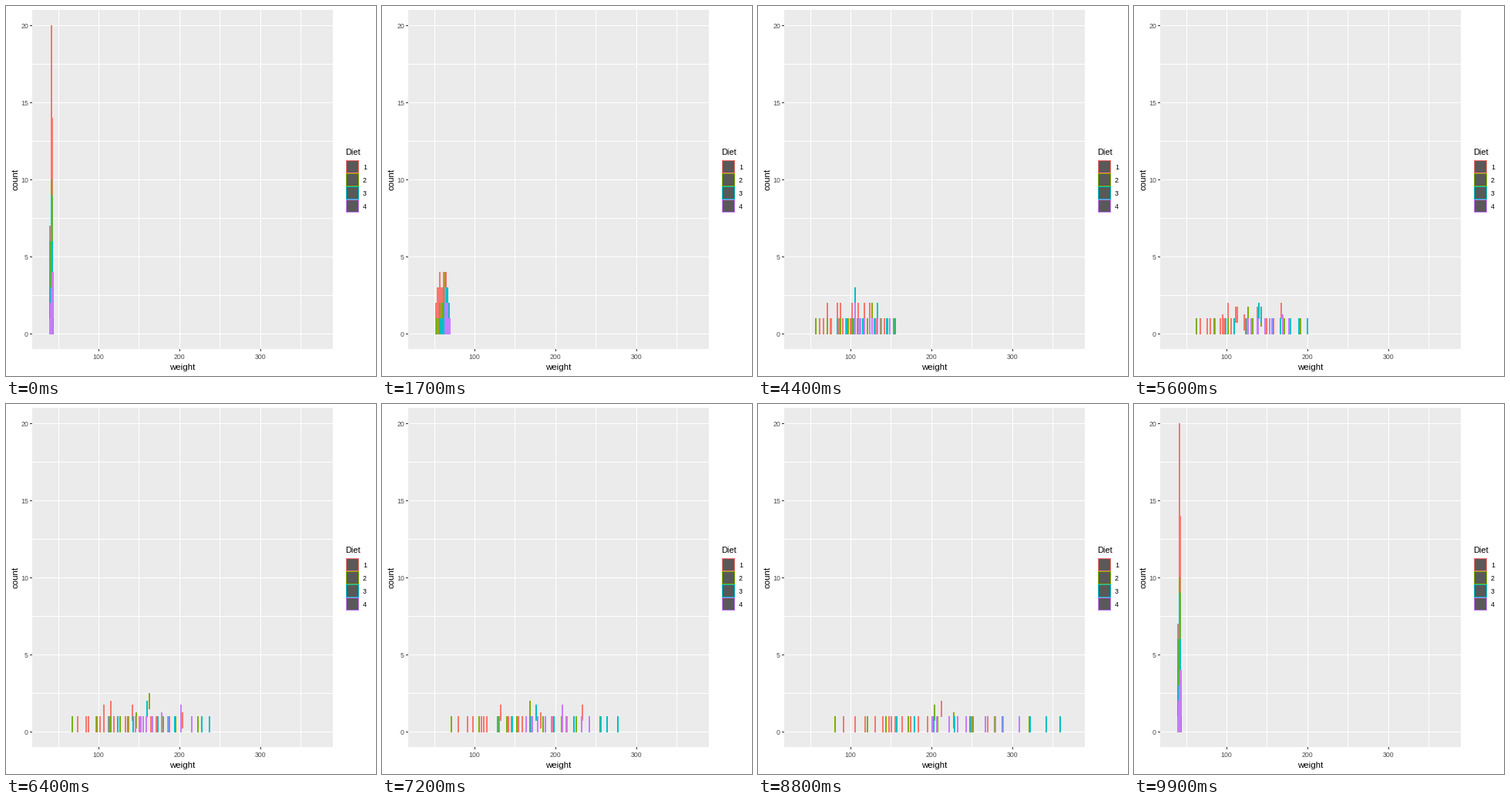
Recreate the animation shown at these times as a matplotlib script. Size 480 by 480 pixels, loop 10 s.

```python
import math

import matplotlib.pyplot as plt
import numpy as np
from matplotlib.animation import FuncAnimation
from matplotlib.collections import PolyCollection
from matplotlib.patches import Rectangle

SIZE = 480
FRAMES, INTERVAL = 100, 100
COLORS = ["#F8766D", "#7CAE00", "#00BFC4", "#C77CFF"]
DAYS = [*range(0, 21, 2), 21]
STARTS = [5, 14, 23, 32, 41, 49, 56, 64, 72, 80, 88, 96]

# Birds per diet weighing 39..43 at hatching
HATCH = [(1, 1, 10, 5, 3), (3, 2, 1, 3, 1), (2, 0, 6, 2, 0), (1, 2, 3, 4, 0)]

# Per diet: gain, power of time, then spread over rank (linear, square, cubic)
GROWTH = [(2.5, 1.3, 0.5, 0.2, 0.3), (3.2, 1.3, 0.45, 0, 0.3),
          (2.85, 1.45, 0.45, -0.03, 0), (4, 1.3, 0.27, 0.07, 0)]


def alive(diet, day):
    if diet == 0:
        return 20 - (day >= 4) - (day >= 14) - (day >= 16) - (day > 20)
    return 10 - (diet == 3 and day >= 20)


def flock(diet, day):
    """Whole weights of one diet on one day."""
    if day == 0:
        return np.repeat(np.arange(39, 44), HATCH[diet])
    gain, power, a, b, c = GROWTH[diet]
    u = np.linspace(-1, 1, alive(diet, day))
    noise = np.random.default_rng(10 * day + diet).normal(0, 0.05, len(u))
    spread = a * u + b * u**2 + c * u**3 + noise * (1 - u**2)
    vigor = 1 + spread * min(1, day / 8)
    return np.rint(41 + gain * day**power * vigor)


def stack(day):
    """Rows of (weight, bottom, top) per diet, last diet lowest."""
    base, rows = {}, {}
    for diet in (3, 2, 1, 0):
        rows[diet] = []
        for x, n in zip(*np.unique(flock(diet, day), return_counts=True)):
            y = base.get(x, 0)
            base[x] = y + n
            rows[diet].append((x, y, y + n))
        rows[diet] = np.array(rows[diet], float)
    return rows


STATES = [stack(day) for day in DAYS]


def tween(a, b, p):
    """Match bars by rank; surplus old bars wait, new ones come at the end."""
    n = min(len(a), len(b))
    return np.vstack([a[:n] + (b[:n] - a[:n]) * p, a[n:]])


def pose(frame):
    state = 0
    for k, start in enumerate(STARTS):
        steps = 3 if k == 5 else 4
        after = (k + 1) % len(STATES)
        if frame >= start + steps - 1:
            state = after
        elif frame >= start:
            p = (frame - start + 1) / steps
            return {d: tween(STATES[k][d], STATES[after][d], p)
                    for d in range(4)}
    return STATES[state]


def snap(v):
    return math.floor(v + 0.5)


def to_x(w):
    return 15.14 + 1.049 * w


def to_y(count):
    return 425 - 20 * count


def bar(x, bottom, top):
    x0 = snap(to_x(x - 0.45))
    y0, y1 = snap(to_y(top)), snap(to_y(bottom)) + 1
    return [(x0, y0), (x0 + 2, y0), (x0 + 2, y1), (x0, y1)]


fig = plt.figure(figsize=(4.8, 4.8), dpi=100, facecolor="white")
ax = fig.add_axes([0, 0, 1, 1])
ax.set_xlim(0, SIZE)
ax.set_ylim(SIZE, 0)
ax.axis("off")


def box(x, y, w, h, color):
    ax.add_patch(Rectangle((x, y), w, h, fc=color, lw=0, antialiased=False))


def label(x, y, text, px, color="black", **kw):
    ax.text(x, y, text, size=px * 0.72, color=color,
            family=["Liberation Sans", "DejaVu Sans"], **kw)


def draw_panel():
    box(34, 5, 390, 440, "#EBEBEB")
    for w in range(50, 351, 50):
        box(snap(to_x(w)), 5, 1, 440, "white")
    for y in range(25, 426, 50):
        box(34, y, 390, 1, "white")
    for w in (100, 200, 300):
        x = snap(to_x(w))
        box(x, 445, 1, 3, "#333333")
        label(x, 458, str(w), 8.8, "#4D4D4D", ha="center")
    for n in range(0, 21, 5):
        y = to_y(n)
        box(31, y, 3, 1, "#333333")
        label(29, y + 4, str(n), 8.8, "#4D4D4D", ha="right")
    label(229, 472, "weight", 11.5, ha="center")
    label(18, 225, "count", 11.5, rotation=90, ha="right", va="center")


def draw_legend():
    label(440, 193, "Diet", 11)
    for k, color in enumerate(COLORS):
        y = 200 + 17 * k
        box(441, y, 17, 17, color)
        box(442, y + 1, 15, 15, "#595959")
        label(463, y + 12, str(k + 1), 8.8)


draw_panel()
draw_legend()
bars = PolyCollection([], linewidths=0, antialiaseds=False, zorder=5)
ax.add_collection(bars)


def update(frame):
    rows = pose(frame)
    verts, colors = [], []
    for diet in range(4):
        for row in rows[diet]:
            verts.append(bar(*row))
            colors.append(COLORS[diet])
    bars.set_verts(verts)
    bars.set_facecolor(colors)
    return [bars]


def reset():
    return update(0)


anim = FuncAnimation(fig, update, frames=FRAMES, interval=INTERVAL,
                     init_func=reset, repeat=True, repeat_delay=0, blit=False)
plt.show()
```
